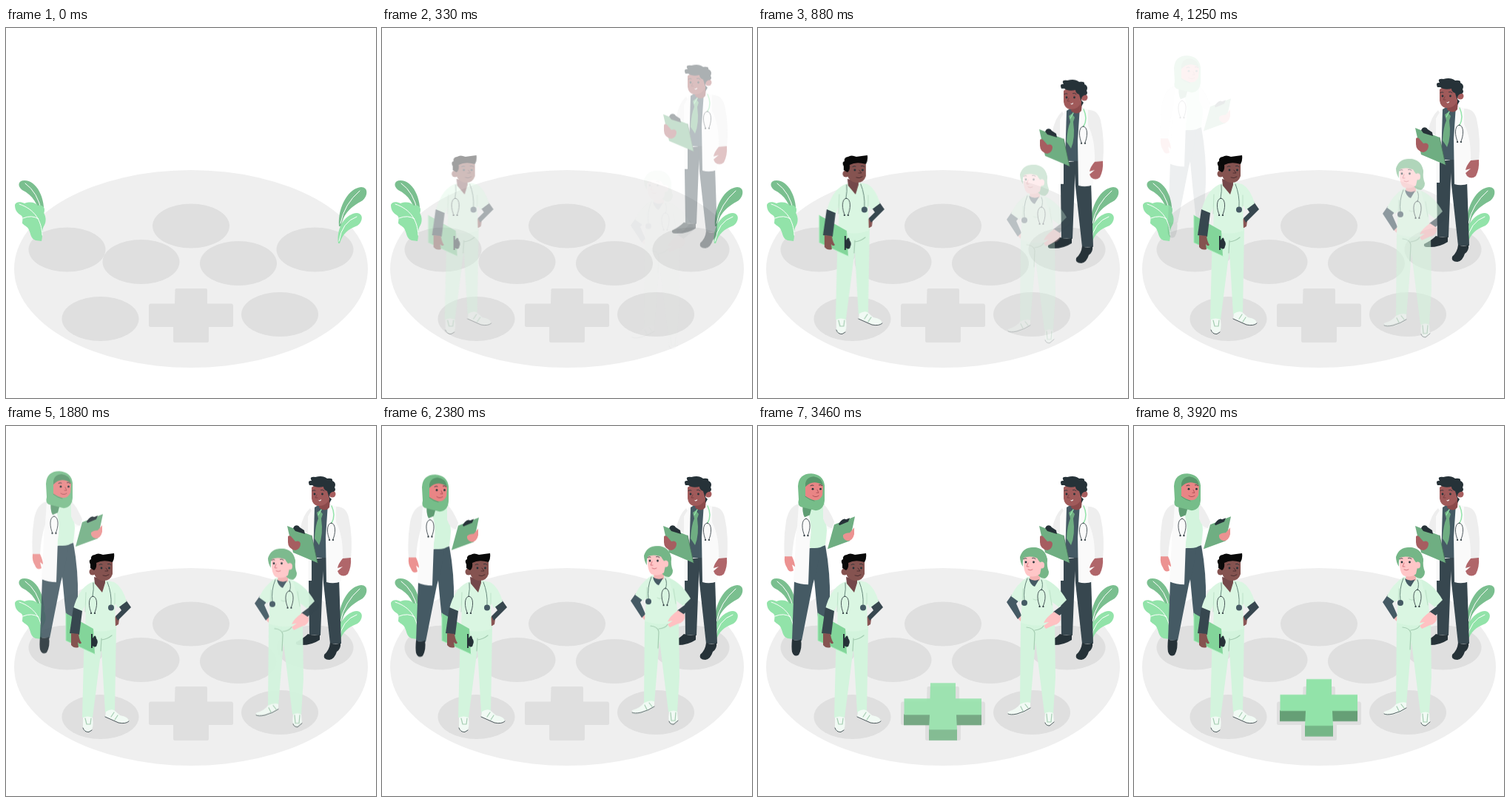
Animation of 500 by 500 pixels, one loop 4 s. Source, as an HTML page:

```html
<!DOCTYPE html>
<html lang="en">
<head>
<meta charset="utf-8">
<title>Medical team</title>
<style>
html, body { margin: 0; width: 100%; height: 100%; overflow: hidden; background: #fff; }
svg { display: block; width: 100vw; height: 100vh; }

.actor { animation: 4s cubic-bezier(.36, -.01, .5, 1.38) infinite; }
#doctor { animation-name: drop; }
#nurse { animation-name: enter; }
#woman { animation-name: rise; }
#veiled { animation-name: lateDrop; }
#cross { animation-name: lateRise; }
@keyframes drop {
  0% { opacity: 0; transform: translateY(-30px); }
  25%, 100% { opacity: 1; transform: none; }
}
@keyframes enter {
  0% { opacity: 0; transform: translateX(-30px); }
  25%, 100% { opacity: 1; transform: none; }
}
@keyframes rise {
  0% { opacity: 0; transform: translateY(30px); }
  75%, 100% { opacity: 1; transform: none; }
}
@keyframes lateDrop {
  0%, 25% { opacity: 0; transform: translateY(-30px); }
  62.5%, 100% { opacity: 1; transform: none; }
}
@keyframes lateRise {
  0%, 68.75% { opacity: 0; transform: translateY(30px); }
  100% { opacity: 1; transform: none; }
}

.floor { fill: #efefef; }
.spot { fill: #dfdfdf; }
.leaf { fill: #7abf8f; }
.bright { fill: #92e3a9; }
.board { fill: #6fae82; }
.ink { fill: #263238; }
.navy { fill: #37474f; }
.slate { fill: #455a64; }
.coat { fill: #fafafa; }
.sleeve { fill: #eeeeee; }
.scrub { fill: #d3f4dd; }
.top { fill: #daf6e2; }
.shoe { fill: #f1faf4; }
.hair { fill: #75b687; }
.line { fill: none; stroke-linecap: round; stroke-linejoin: round; }
.vein { stroke: #fff; stroke-width: 1; }
.tube { stroke: #66877b; stroke-width: 1; }
.fold { stroke: #a5cdb2; stroke-width: 1.2; }
.pen { stroke: #263238; stroke-width: .8; }
</style>
</head>
<body>
<svg viewBox="0 0 500 500">
  <defs>
    <g id="loop">
      <path class="line pen" d="M0 0C-7 1 -6 15 -2 23M0 0C7 1 6 15 2 23"/>
      <circle class="ink" cx="-2.5" cy="23" r="1.1"/><circle class="ink" cx="2.5" cy="23" r="1.1"/>
    </g>
    <g id="eyes">
      <circle class="ink" r="1.4"/><circle class="ink" cx="10.5" r="1.4"/>
      <path class="line pen" d="M-3 -4.5Q-1 -6 1 -5M8.5 -5.5Q11 -6.5 13 -4.5"/>
    </g>
  </defs>

  <ellipse class="floor" cx="250" cy="325.5" rx="239" ry="133.5"/>
  <g class="spot">
    <ellipse cx="82.5" cy="299.5" rx="52" ry="30"/>
    <ellipse cx="182.5" cy="316" rx="52" ry="30"/>
    <ellipse cx="250" cy="267.5" rx="52" ry="30"/>
    <ellipse cx="314" cy="318" rx="52" ry="30"/>
    <ellipse cx="417.5" cy="299.5" rx="52" ry="30"/>
    <ellipse cx="127.5" cy="393" rx="52" ry="30"/>
    <ellipse cx="370" cy="387" rx="52" ry="30"/>
    <path d="M230 352H270Q272 352 272 354V372.5H305Q307 373 307 375V402Q307 404 305 404H274V423Q274 425 272 425H228Q226 425 226 423V404H195Q193 404 193 402V375Q193 373 195 372.5H228L228.5 354Q228.5 352 230 352Z"/>
  </g>

  <g id="plants">
    <path class="leaf" d="M51 256C54 229 41 206 25 206C16 206 15 214 22 219C36 226 44 238 46 256Z"/>
    <path class="line vein" d="M26 210Q43 222 48 248"/>
    <path class="bright" d="M12 239C13 235 19 234 25 237C33 234 40 236 43 240C50 238 54 244 51 250C55 256 54 264 51 268C48 273 50 281 48 288L40 287C33 284 34 279 31 273C29 268 26 268 22 264C22 258 24 256 20 253C15 250 12 246 12 239Z"/>
    <path class="line vein" d="M18 238C39 245 48 260 49 280M23 257Q35 252 44 258"/>
    <path class="leaf" d="M450 268C448 240 464 216 480 215C490 215 489 227 482 233C466 242 456 250 453 268Z"/>
    <path class="line vein" d="M478 220Q457 238 452 264"/>
    <path class="bright" d="M449 291C446 268 460 251 474 250C484 251 482 262 475 267C462 272 455 278 451 291Z"/>
    <path class="line vein" d="M474 255Q454 262 450 288"/>
  </g>

  <g id="doctor" class="actor">
    <path class="sleeve" d="M411 111Q401 120 398 138L410 147L416 120Z"/>
    <path class="coat" d="M417 107L408 122V209H418V120Z"/>
    <path class="navy" d="M413 180L429 178L425 283L410 282L409 209H413Z"/>
    <path class="navy" d="M427 177H449L453 294H438L429 212Z"/>
    <path class="ink" d="M392 292Q402 287 408 281Q416 284 424 282V289Q412 297 396 296Q391 296 392 292Z"/>
    <path class="ink" d="M438 293Q446 296 452 293Q453 301 447 305Q444 315 437 316Q428 316 430 309Q437 303 438 293Z"/>
    <path class="slate" d="M417 110L425 105L439 106L437 178H415Z"/>
    <path class="board" d="M420 117L424 114L428 119L426 125Q429 147 423 161L417 152Q418 134 422 125Z"/>
    <path class="coat" d="M435 105L448 109Q459 120 456 151L453 210Q443 214 433 211L432 150Z"/>
    <path class="sleeve" d="M446 109Q459 108 463 123Q469 150 466 180L455 181Q456 148 446 130Z"/>
    <path d="M455 179L466 178Q467 190 462 200Q456 205 450 200L448 196L455 190L448 192Q449 186 455 179Z" fill="#b0666a"/>
    <path class="line" stroke="#92e3a9" stroke-width="1.5" d="M440 108Q446 121 440 131M426 113L422 120"/>
    <use href="#loop" x="439.5" y="131"/>
    <path d="M424 102L438 98L437 110Q431 117 423 110Z" fill="#8b4a4b"/>
    <circle cx="441" cy="92" r="4.5" fill="#a75d5e"/>
    <path d="M413 83Q425 73 438 82L437 99Q432 109 421 108Q414 106 413 98Z" fill="#a05a5a"/>
    <path class="ink" d="M410 80Q407 73 413 74Q409 68 418 69Q428 66 434 71Q442 70 441 74Q447 77 444 83Q447 88 441 89Q436 91 437 98L434 88Q429 86 429 82Q419 84 414 80Z"/>
    <path class="ink" d="M437 96L440 99L437 104Z"/>
    <use href="#eyes" x="417" y="92"/>
    <path d="M420 93L418 97H421" class="line" stroke="#733c3e" stroke-width=".8"/>
    <path d="M422 100.500Q424.500 100.500 426 99Q426 101.500 423.500 101.500Z" fill="#fff"/>
    <path class="board" d="M380 135L413 148L421 185L388 171Z"/>
    <path class="line" d="M413 148L421 185" stroke="#4c7a5c" stroke-width=".8"/>
    <path class="ink" d="M388 138L390 135Q395 133 397 137L403 141L404 146L391 142Z"/>
    <path d="M381 150Q381 147 385 149L391 156Q397 154 398 159Q398 166 391 168Q381 166 381 157Z" fill="#a65d60"/>
  </g>

  <g id="veiled" class="actor">
    <g transform="translate(0 -.8)">
      <path class="coat" d="M89 106L103 130L102 138L93 141L97 206L89 203L86 120Z"/>
      <path class="slate" d="M72 165L91 162Q98 200 97 237L94 288H84L79 240Z"/>
      <path class="slate" d="M68 166L84 165Q83 185 74 215L59 291L46 290L49 209Z"/>
      <path class="ink" d="M46 289Q53 292 58 289Q60 301 55 310Q49 314 46 306Q45 299 46 289Z"/>
      <path class="scrub" d="M65 108Q82 101 90 106L93 142L91 161Q82 168 69 165Z"/>
      <path class="coat" d="M53 107L64 109Q75 132 70 158L68 215Q57 215 48 211L51 158Z"/>
      <path class="sleeve" d="M55 106Q42 109 38 129Q34 154 36 178H46Q47 156 53 137Z"/>
      <path class="sleeve" d="M88 106Q95 111 103 130L100 139Q92 138 88 126Z"/>
      <path d="M36 177H46Q50 186 50 191L46 188L48 196Q42 200 39 192Q35 186 36 177Z" fill="#ec9291"/>
      <path d="M61 106H74L70 121L63 124Q59 117 61 106Z" fill="#5f9d73"/>
      <use href="#loop" x="65" y="126"/>
      <path d="M54 82Q55 65 72 65Q88 66 90 81V101Q89 114 78 115L58 110Q53 108 55 100Z" fill="#76bd89"/>
      <path d="M64 82Q68 72 83 75L88 82L87 94Q84 102 75 101L64 96Z" fill="#e98585"/>
      <path d="M64 83Q63 70 75 69Q86 70 88 81Q74 72 64 83Z" fill="#59966b"/>
      <use href="#eyes" x="74" y="86"/>
      <path class="line" stroke="#a94f55" stroke-width=".9" d="M80 87L82 91H79M74 95Q78 98 82 95"/>
      <path class="line" stroke="#59966b" d="M64 96Q70 101 76 102"/>
      <path class="board" d="M103 134L131 123L124 156L94 167Z"/>
      <path class="ink" d="M109 133L112 129Q116 125 119 127L124 125L122 130L110 135Z"/>
      <path d="M130 138V147Q128 156 121 156Q114 154 115 148Q118 145 124 145Z" fill="#ec9291"/>
    </g>
  </g>

  <g id="nurse" class="actor">
    <path d="M147 258L154 254L152 268L147 271Z" fill="#8a5655"/>
    <path class="navy" d="M152 243L162 235L169 245L151 263L148 257L156 249Z"/>
    <path class="scrub" d="M106 270L130 278L129 300L117 394H103Z"/>
    <path class="scrub" d="M126 276L149 270L147 386L134 387L129 302Z"/>
    <path class="line fold" d="M129 287L128 304M129 289Q137 288 143 283"/>
    <path class="shoe" d="M104 394Q110 391 117 394Q119 409 114 413Q107 415 104 409Z"/>
    <path class="shoe" d="M135 386Q141 382 146 384L154 391Q166 393 166 399Q162 403 153 401L134 393Z"/>
    <path class="line pen" d="M104 408Q106 414 112 413.500L116 411M134 393L152 401Q162 403 166 399"/>
    <path class="line fold" d="M107 395L109 403H114L115 395M146 387L142 393M151 391L147 397"/>
    <path class="top" d="M114 212Q128 206 146 211Q157 217 163 237L151 246L147 238L148 274Q128 281 107 274L108 240L103 251L91 247Q98 220 114 212Z"/>
    <path class="line" stroke="#bde2c8" d="M108 225L107 251M147 226V241"/>
    <path d="M119 204L134 207L134 212L130 225L120 213Z" fill="#74484a"/>
    <path class="line tube" d="M118 212Q119 220 117 230M137 211Q143 226 142 242"/>
    <circle class="slate" cx="142" cy="245.5" r="4"/>
    <use href="#loop" x="117.5" y="230"/>
    <circle cx="117" cy="197" r="4.5" fill="#85524f"/>
    <path d="M119 184Q133 176 144 184L144 200Q141 210 130 209Q121 207 119 199Z" fill="#855350"/>
    <path d="M114 187Q111 181 115 180Q114 175 120 174Q124 171 131 174Q138 173 146 172Q147 179 144 184Q131 180 122 185Q123 192 119 195L114 192Z" fill="#090909"/>
    <use href="#eyes" x="129" y="192"/>
    <path class="line" stroke="#472b2d" stroke-width=".9" d="M135 192L138 196H134M131 202Q135 204 139 201"/>
    <path d="M81 253L118 274L120 308L81 290Z" fill="#83d59a"/>
    <path class="line" d="M81 253V290L120 308" stroke="#a5edb9"/>
    <path class="ink" d="M115 281H117V287Q121 280 122 287Q125 291 123 295Q122 301 117 297V300H115Z"/>
    <path class="navy" d="M91 245L103 250L99 282L86 280Z"/>
    <path d="M88 280L98 281Q99 289 102 293Q100 296 97 292L98 299Q92 301 88 296Z" fill="#855350"/>
  </g>

  <g id="woman" class="actor">
    <path d="M349 258L355 254L356 265Z" fill="#f7b8b8"/>
    <path class="slate" d="M343 228L336 238L351 261L356 256L349 240L354 234Z"/>
    <path class="scrub" d="M355 262L380 270L375 291L368 377L354 376Z"/>
    <path class="scrub" d="M372 270L401 264L402 340L399 388H387L376 300Z"/>
    <path class="line fold" d="M363 272Q373 273 374 280L373 302M374 276Q383 275 386 270"/>
    <path class="shoe" d="M354 376Q362 372 368 374V382Q356 391 341 391Q336 390 338 386Q349 383 354 376Z"/>
    <path class="shoe" d="M388 388Q394 385 399 388L400 400Q396 406 390 405Q386 401 388 388Z"/>
    <path class="line pen" d="M338 389Q341 391 350 389Q361 386 368 381M388 401Q389 405 394 405L400 400"/>
    <path class="line fold" d="M355 379L358 385M361 376L365 381M390 389L391 400H396L397 389"/>
    <path class="navy" d="M404 239L416 231L423 243L404 259L398 252L410 243Z"/>
    <path class="top" d="M364 204Q376 201 388 207L397 225L400 266Q378 273 355 266L357 234L353 238L342 230Q349 214 364 204Z"/>
    <path class="scrub" d="M388 207Q405 214 417 235L407 245L395 236Z"/>
    <path class="line" stroke="#bde2c8" d="M358 220L357 242M394 222L397 242M372 234Q377 237 380 233"/>
    <path d="M368 201L381 200L381 208Q375 214 367 207Z" fill="#f4b2b2"/>
    <path class="slate" d="M366 206Q374 211 380 207L374 217Q368 215 366 206Z"/>
    <path class="line tube" d="M364 206Q358 220 360 236M383 208Q386 214 383 222"/>
    <circle class="slate" cx="360" cy="239" r="4"/>
    <use href="#loop" x="383" y="221"/>
    <path class="hair" d="M357 178Q360 164 374 164Q388 165 391 180Q390 190 393 197Q393 203 388 206Q382 206 379 202Z"/>
    <path d="M359 178Q369 174 381 180L384 186L381 200Q373 206 364 202Q358 197 359 178Z" fill="#ffc6c7"/>
    <path class="hair" d="M354 177Q358 163 374 164Q389 167 391 182L388 190Q380 185 377 178Q368 173 360 177Q357 181 358 190Q354 184 354 177Z"/>
    <ellipse cx="383.5" cy="188" rx="3.5" ry="4.5" fill="#ffc6c7"/>
    <use href="#eyes" x="362" y="184"/>
    <path class="line" stroke="#d16f79" stroke-width=".9" d="M365 185L363 190H366M365 194Q368 196 371 194"/>
    <path d="M400 251L409 257Q410 267 400 269L389 274L386 270L393 265L386 266Q389 259 400 251Z" fill="#ffc1c2"/>
  </g>

  <g id="cross" class="actor">
    <g transform="translate(0 1.35)">
      <path d="M197 384H232V399H197ZM268 384H302V399H268Z" fill="#669f76"/>
      <path d="M231 404H269V419.5H231Z" fill="#75b687"/>
      <path class="bright" d="M233 342H267V363H302V385H268L269 405H231L232 385H197.5V363H232.5Z"/>
    </g>
  </g>
</svg>
</body>
</html>
```
